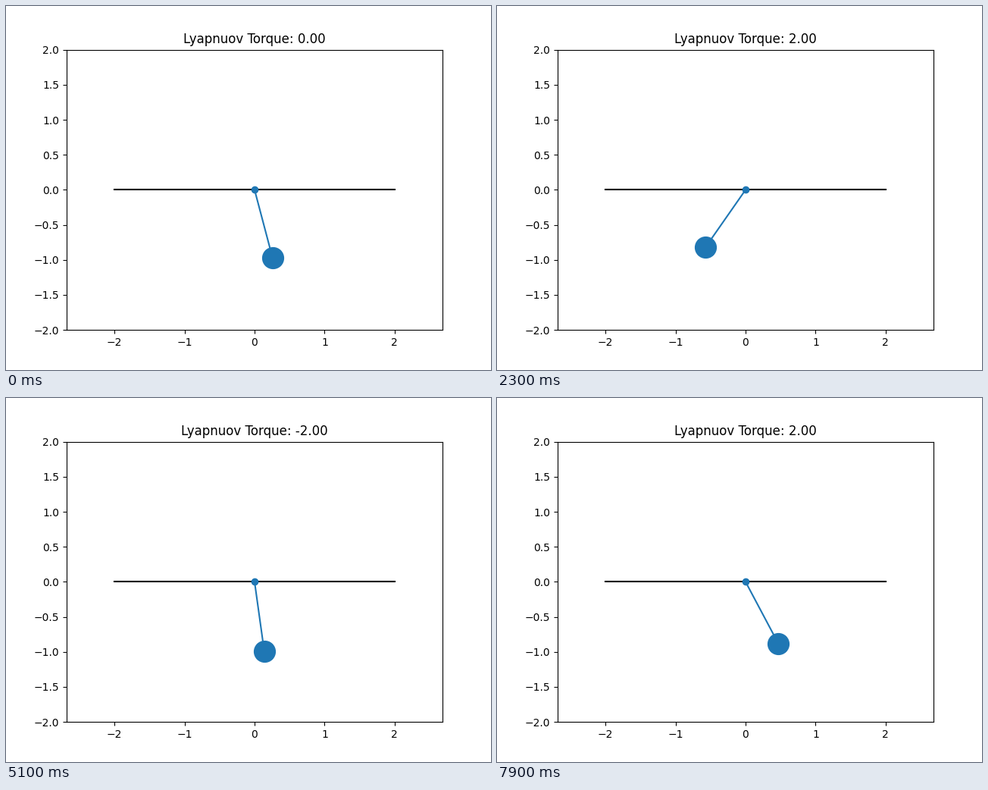
A matplotlib script that plays this animation: 640 by 480 pixels, repeating every 8 s.

```python
import numpy as np
import matplotlib.pyplot as plt
from matplotlib.animation import FuncAnimation

G = 9.81          # unit mass, unit length
GAIN = 1.0
MAX_TORQUE = 2.0
DT = 0.05
FRAMES = 80


def deriv(state, torque):
    angle, speed = state
    return np.array([speed, torque - G * np.sin(angle)])


def rk4_step(state, torque):
    k1 = deriv(state, torque)
    k2 = deriv(state + DT / 2 * k1, torque)
    k3 = deriv(state + DT / 2 * k2, torque)
    k4 = deriv(state + DT * k3, torque)
    return state + DT / 6 * (k1 + 2 * k2 + 2 * k3 + k4)


def control(state):
    """Pump energy toward that of the upright rest position."""
    angle, speed = state
    energy = speed**2 / 2 - G * np.cos(angle)
    return np.clip(GAIN * speed * (G - energy), -MAX_TORQUE, MAX_TORQUE)


def simulate():
    state = np.array([np.radians(15), 0.0])
    history = []
    for _ in range(FRAMES):
        torque = control(state)
        state = rk4_step(state, torque)
        history.append((state[0], torque))
    return history


history = simulate()

plt.rcParams["font.family"] = "DejaVu Sans"
fig, ax = plt.subplots(figsize=(6.4, 4.8), dpi=100)
half_width = 2 * 496 / 369.6
ax.set_xlim(-half_width, half_width)
ax.set_ylim(-2, 2)

ax.plot([-2, 2], [0, 0], color="black")
rod, = ax.plot([], [], color="C0")
ax.plot([0], [0], "o", color="C0")
bob, = ax.plot([], [], "o", color="C0", markersize=20)
title = ax.set_title("")


def draw(i):
    angle, torque = history[i]
    x, y = np.sin(angle), -np.cos(angle)
    rod.set_data([0, x], [0, y])
    bob.set_data([x], [y])
    title.set_text(f"Lyapnuov Torque: {torque:.2f}")
    return rod, bob, title


anim = FuncAnimation(fig, draw, frames=FRAMES, init_func=lambda: draw(0),
                     interval=100, repeat=True, repeat_delay=0)
plt.show()
```
